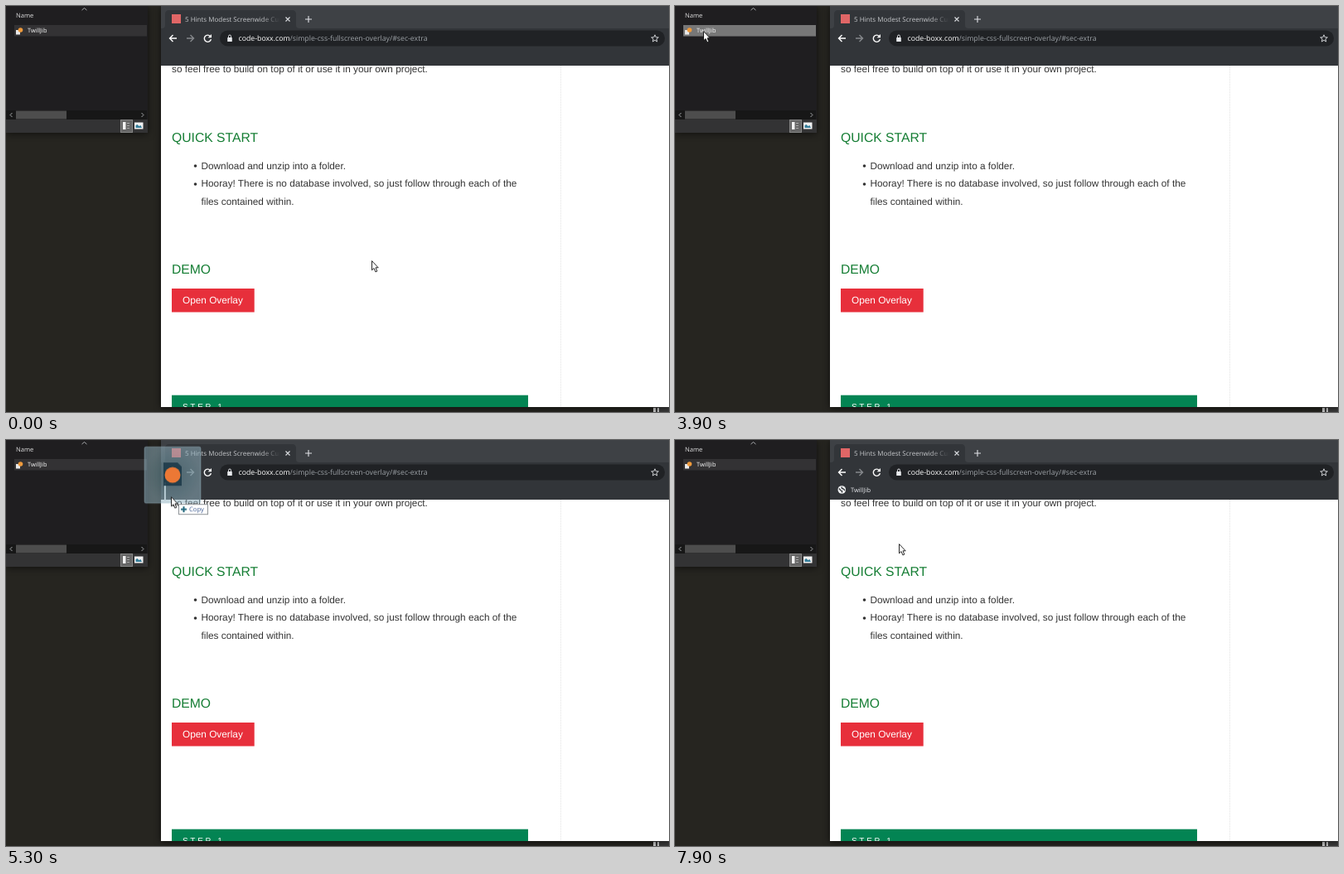
An HTML page that plays this animation: 800 by 490 pixels, repeating every 8000 ms.

```html
<!DOCTYPE html>
<html lang="en">
<head>
<meta charset="utf-8">
<title>Drag a shortcut to the bookmarks bar</title>
<style>
html, body { margin: 0; width: 800px; height: 490px; overflow: hidden; background: #262520; }
svg { display: block; }
text { text-rendering: geometricPrecision; white-space: pre; }
.ui { font-family: "Open Sans", "Noto Sans", sans-serif; }
.page { font: 11.8px "Liberation Sans", Arial, sans-serif; fill: #333; }
.head { font-size: 15.7px; fill: #147d33; }
.window { filter: drop-shadow(0 1px 4px rgba(0, 0, 0, .6)); }
.line { fill: none; stroke: #dfe1e5; stroke-width: 1.4; }

#pointer { animation: move 8s infinite; }
#row, #ghost, #label, #caret, #bookmark { opacity: 0; animation: 8s step-end infinite; }
#row { animation-name: hover; }
#ghost { animation-name: drag; }
#label { animation-name: tip; }
#caret { animation-name: insert; }
#bookmark { animation-name: drop; }

@keyframes hover { 0%, 55% { opacity: 0 } 40% { opacity: 1 } }
@keyframes drag { 0%, 75% { opacity: 0 } 52.5% { opacity: 1 } }
@keyframes tip { 0%, 75% { opacity: 0 } 62.5% { opacity: 1 } }
@keyframes insert { 0%, 75% { opacity: 0 } 66.25% { opacity: 1 } }
@keyframes drop { 0% { opacity: 0 } 75%, 100% { opacity: 1 } }

/* One step per 100 ms, i.e. 1.25% */
@keyframes move {
  0% { transform: translate(441px, 307px); animation-timing-function: step-end }
  2.5% { transform: translate(441px, 307px); animation-timing-function: steps(2) }
  5% { transform: translate(438px, 317px); animation-timing-function: step-end }
  10% { transform: translate(438px, 317px); animation-timing-function: steps(3) }
  13.75% { transform: translate(408px, 314px); animation-timing-function: step-end }
  16.25% { transform: translate(408px, 314px); animation-timing-function: steps(3) }
  20% { transform: translate(344px, 294px); animation-timing-function: step-end }
  23.75% { transform: translate(344px, 294px); animation-timing-function: steps(3) }
  27.5% { transform: translate(300px, 265px); animation-timing-function: steps(3) }
  31.25% { transform: translate(190px, 200px); animation-timing-function: steps(2) }
  33.75% { transform: translate(130px, 169px); animation-timing-function: steps(4) }
  38.75% { transform: translate(65px, 68px); animation-timing-function: steps(3) }
  42.5% { transform: translate(34px, 30px); animation-timing-function: step-end }
  52.5% { transform: translate(37px, 31px); animation-timing-function: steps(7) }
  61.25% { transform: translate(132px, 66px); animation-timing-function: steps(1) }
  62.5% { transform: translate(178px, 70px); animation-timing-function: steps(5) }
  68.75% { transform: translate(213px, 67px); animation-timing-function: step-end }
  77.5% { transform: translate(213px, 67px); animation-timing-function: steps(6) }
  85% { transform: translate(492px, 180px); animation-timing-function: steps(4) }
  90% { transform: translate(202px, 59px); animation-timing-function: steps(3) }
  93.75%, 100% { transform: translate(270px, 125px) }
}
</style>
</head>
<body>
<svg width="800" height="490" viewBox="0 0 800 490">
  <defs>
    <linearGradient id="fade" gradientUnits="userSpaceOnUse" x1="308" x2="331" y1="0" y2="0">
      <stop stop-color="#c3c5c8"/><stop offset="1" stop-color="#c3c5c8" stop-opacity="0"/>
    </linearGradient>
    <radialGradient id="glass">
      <stop stop-color="#6a9dac" stop-opacity=".48"/><stop offset="1" stop-color="#92b4c2" stop-opacity=".52"/>
    </radialGradient>
    <clipPath id="view"><path d="M187 72H800V484H187Z"/></clipPath>
  </defs>

  <rect width="800" height="490" fill="#262520"/>
  <rect x="781" y="484" width="19" height="6" fill="#3b3b3b"/>
  <path d="M781 485h3v5h-3zM786 485h2v5h-2z" fill="#c8c8c8"/>

  <g class="window">
    <rect width="171" height="153" fill="#1f1e20"/>
    <rect y="137" width="171" height="16" fill="#333334"/>
  </g>
  <g class="ui">
    <path d="M91.500 5l3-2.500 3 2.500" class="line" stroke-opacity=".7" style="stroke-width:1"/>
    <text x="12" y="13.500" font-size="7.600" fill="#dedede">Name</text>
    <rect x="10" y="23" width="160" height="13.500" fill="#333234"/>
    <rect id="row" x="10" y="23" width="160" height="13.500" fill="#777"/>
    <rect x="12" y="29" width="5" height="5.500" fill="#e8e8e8"/>
    <circle cx="17.500" cy="29" r="2.800" fill="#ee9a3c"/>
    <text x="26" y="32.300" font-size="7.300" fill="#fff">TwillJib</text>
    <rect y="126" width="170" height="11" fill="#171717"/>
    <rect x="12" y="126.500" width="61" height="10" fill="#4d4d4d"/>
    <path d="M7.500 129l-2.500 2.500 2.500 2.500M163.500 129l2.500 2.500-2.500 2.500" class="line" stroke-opacity=".7" style="stroke-width:1"/>
    <rect x="138.500" y="137.500" width="14" height="15" fill="#666" stroke="#858585"/>
    <path d="M141 140h3.500v9h-3.500z" fill="#f2f2f2"/>
    <path d="M146 141.500h3M146 144.500h3M146 147.500h3" stroke="#aaa"/>
    <rect x="155" y="140.500" width="10.500" height="8" fill="#f0f0f0"/>
    <path d="M156.500 147v-3l2-1 2 2 2-1 1.500 3z" fill="#367f9b"/>
  </g>

  <rect class="window" x="187" y="0" width="614" height="484" fill="#fff"/>
  <g class="page" clip-path="url(#view)">
    <path d="M669.500 72V484" stroke="#e3e3e3" stroke-dasharray="1 1"/>
    <text x="200" y="80">so feel free to build on top of it or use it in your own project.</text>
    <text class="head" x="200" y="164">QUICK START</text>
    <circle cx="228.500" cy="193" r="1.800"/>
    <text x="235.500" y="196.500">Download and unzip into a folder.</text>
    <circle cx="228.500" cy="215" r="1.800"/>
    <text x="235.500" y="218.300">Hooray! There is no database involved, so just follow through each of the</text>
    <text x="235.500" y="240">files contained within.</text>
    <text class="head" x="200" y="323">DEMO</text>
    <rect x="200" y="341" width="99.700" height="28.500" fill="#e72f3b"/>
    <text x="213" y="359" fill="#fff">Open Overlay</text>
    <rect x="200" y="469.700" width="430" height="15" fill="#038453"/>
    <text x="213" y="486.500" fill="#fff" style="font-size:10px;letter-spacing:2.700px">STEP 1</text>
  </g>

  <g class="ui">
    <rect x="187" width="613" height="28" fill="#3e4145"/>
    <path d="M187 27h1q4 0 4-4V10q0-5 5-5H345q5 0 5 5V23q0 4 4 4H800V72H187Z" fill="#323539"/>
    <rect x="200" y="10" width="11" height="11" fill="#e06666"/>
    <text x="216" y="18.500" font-size="8" fill="url(#fade)">5 Hints Modest Screenwide Curtain</text>
    <path d="M337.500 13.500l5 5m0-5l-5 5M361 16h8m-4-4v8" class="line" style="stroke-width:1.100"/>
    <rect x="258" y="29.500" width="537" height="19" rx="9.500" fill="#202225"/>
    <path d="M206 39h-8.500m4-4l-4 4 4 4" class="line" style="stroke:#fff"/>
    <path d="M218 39h8.500m-4-4l4 4-4 4" class="line" style="stroke:#85888c"/>
    <path d="M246.500 36.500a4.100 4.100 0 1 0 .9 3.700" class="line" style="stroke:#fff"/>
    <path d="M248 34v4.300h-4.300z" fill="#fff"/>
    <rect x="267.200" y="38" width="5.600" height="5" rx=".6" fill="#e8eaed"/>
    <path d="M268.500 38v-1.500a1.500 1.500 0 0 1 3 0V38" class="line" style="stroke-width:1"/>
    <text x="280.500" y="42.300" font-size="8.750" fill="#fff">code-boxx.com<tspan fill="#9ba0a5">/simple-css-fullscreen-overlay/#sec-extra</tspan></text>
    <path d="M783 34.800l1.200 2.900 3.100.2-2.400 2 .8 3.100-2.700-1.700-2.700 1.700.8-3.100-2.400-2 3.100-.2z" class="line" style="stroke-width:.9"/>
    <g id="bookmark">
      <circle cx="201.300" cy="60" r="4.800" fill="#f1f3f4"/>
      <path d="M198 58.500l2 2.500 1.500.5v2M201 56.500l.5 2 2 .5 1.500 2" fill="none" stroke="#323539" stroke-width="1.300"/>
      <text x="212" y="62.800" font-size="7.500" fill="#e8eaed">TwillJib</text>
    </g>
    <rect id="caret" x="191" y="51" width="1.800" height="22" fill="#f4f5f6"/>
  </g>

  <g id="pointer" class="ui">
    <g id="ghost">
      <rect x="-32" y="-60" width="68" height="68" rx="2" fill="url(#glass)" stroke="#a5c3d0" stroke-opacity=".35"/>
      <path d="M-9-41H8l5 5v23H-9Z" fill="#1e3b49" fill-opacity=".9"/>
      <circle cx="2" cy="-26" r="9.500" fill="#ec7835"/>
    </g>
    <g id="label">
      <rect x="9.500" y="9.500" width="35" height="12" fill="#fff" stroke="#8d9296"/>
      <path d="M12 15.500h7M15.500 12v7" stroke="#22687d" stroke-width="2"/>
      <text x="22" y="18.200" font-size="7.600" fill="#3d5a91">Copy</text>
    </g>
    <path d="M.5.600V11.800L3 9.500l1.900 4.400 1.900-.8L5 8.800h3.200Z" fill="#fff" stroke="#111" stroke-width=".9"/>
  </g>
</svg>
</body>
</html>
```
